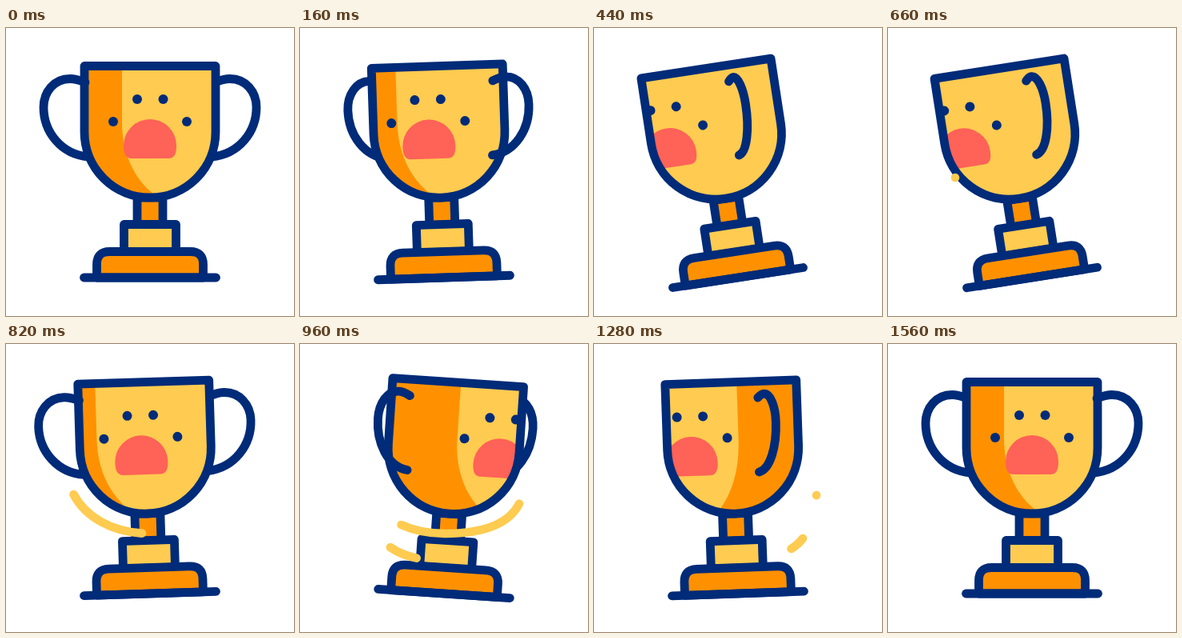
An HTML page that plays this animation: 360x360 px, repeating every 2.4 s.

```html
<!DOCTYPE html>
<html lang="en">
<head>
<meta charset="utf-8">
<title>Spinning trophy</title>
<style>
  html, body { margin: 0; height: 100%; overflow: hidden; background: #fff; }
  svg { display: block; width: 100vw; height: 100vh; }
  .line { stroke: #002b78; stroke-width: 10.8; stroke-linecap: round; stroke-linejoin: round; }
  .none { fill: none; }
  .amber { fill: #ff9100; }
  .gold { fill: #ffcb50; }
  .trail { fill: none; stroke: #ffcb50; stroke-width: 10.6; stroke-linecap: round; }
</style>
</head>
<body>
<svg viewBox="0 0 360 360">
  <defs>
    <path id="cup" d="M98 47.5H262V130A82 82 0 0 1 98 130Z"/>
    <clipPath id="inside"><use href="#cup"/></clipPath>
    <g id="face">
      <path fill="#ff6257" d="M157 163C150 163 147 158 147 147A33 33 0 0 1 213 147C213 158 210 163 203 163Z"/>
      <g fill="#002b78">
        <circle cx="134" cy="117" r="6"/><circle cx="164" cy="89" r="6"/>
        <circle cx="196.500" cy="89" r="6"/><circle cx="226" cy="117" r="6"/>
      </g>
    </g>
  </defs>
  <g id="trophy">
    <path id="back" class="line none"/>
    <path class="line amber" d="M164 212H196V246H164Z"/>
    <path class="line gold" d="M147.500 245.500H212.500V280H147.500Z"/>
    <path class="line amber" d="M113.500 312V295.500Q113.500 279.500 129.500 279.500H230.500Q246.500 279.500 246.500 295.500V312Z"/>
    <path class="line none" d="M97.500 312H262.500"/>
    <g clip-path="url(#inside)">
      <use href="#cup" class="amber"/>
      <path id="panelA" class="gold"/>
      <path id="panelB" class="gold"/>
      <use id="faceA" href="#face"/>
      <use id="faceB" href="#face"/>
    </g>
    <use href="#cup" class="line none"/>
    <path id="front" class="line none"/>
  </g>
  <path id="trail1" class="trail" pathLength="1" d="M84 187C100 219 138 237 181 237S268 227 278 189"/>
  <path id="trail2" class="trail" pathLength="1" d="M101 243C118 264 148 271 181 271S246 263 261 243"/>
</svg>
<script>
const LOOP = 2400, STEP = 20, TURN = 251;
const WOUND = 580, DONE = 1560; // end of the wind-up, end of the spin
const $ = id => document.getElementById(id);
const set = (id, name, value) => $(id).setAttribute(name, value);

// Smoothstep from 0 to 1 between two times; pow < 1 starts faster
function ease(t, from, to, pow = 1) {
  const u = Math.min(Math.max((t - from) / (to - from), 0), 1) ** pow;
  return u * u * (3 - 2 * u);
}

// Side handle squeezed by k towards the cup's axis; k < 0 puts it on the left
function handle(k) {
  const p = (x, y) => `${(180 + x * k).toFixed(2)} ${y} `;
  return `M${p(81, 68)}C${p(86, 66)}${p(93, 63.5)}${p(100, 63.5)}` +
    `C${p(120, 63.5)}${p(133, 80)}${p(133, 99)}C${p(133, 130)}${p(111, 158)}${p(77, 161)}`;
}

// Light front panel of the cup between two curved edges
const panel = (left, right) =>
  `M${left} 40V118C${left} 155 ${left + 14} 188 ${left + 40} 208L${left + 60} 220` +
  `H${right - 40}L${right - 28} 208C${right - 9} 185 ${right} 155 ${right} 118V40Z`;

function trail(id, head, tail) {
  $(id).style.display = head > 0 && tail < 1 ? '' : 'none';
  set(id, 'stroke-dasharray', `${Math.max(head - tail, 0)} 2`);
  set(id, 'stroke-dashoffset', -tail);
}

function draw(t) {
  const wind = ease(t, 0, WOUND);

  const tilt = -10.2 * wind + 14.8 * ease(t, WOUND, 1020)
    - 6.7 * ease(t, 1020, 1300) + 2.1 * ease(t, 1300, DONE);
  set('trophy', 'transform', `rotate(${tilt} 180 312)`);

  // Right handle leads while winding up, left handle while spinning
  const swing = 0.8 * (ease(t, WOUND, 840) - wind) + 2 * ease(t, 780, DONE);
  const k = swing < 0 ? 1 + swing : swing - 1;
  set('front', 'd', handle(k));
  set('back', 'd', handle(-k));

  // The face leaves on the right and comes back from the left
  const x = -71 * wind + (71 + TURN) * ease(t, WOUND, DONE, 0.88);
  const next = x - TURN;
  set('faceA', 'x', x);
  set('faceB', 'x', next);
  set('panelA', 'd', panel(145 + x - 20 * wind, 700));
  set('panelB', 'd', panel(145 + next, 300 + 2.14 * next));

  trail('trail1', ease(t, 657, 1007), ease(t, 800, 1285));
  trail('trail2', ease(t, 830, 1190), ease(t, 860, 1390));
}

const start = performance.now();
function tick() {
  const t = (performance.now() - start) % LOOP;
  draw(Math.floor(t / STEP) * STEP);
  requestAnimationFrame(tick);
}
tick();
</script>
</body>
</html>
```
